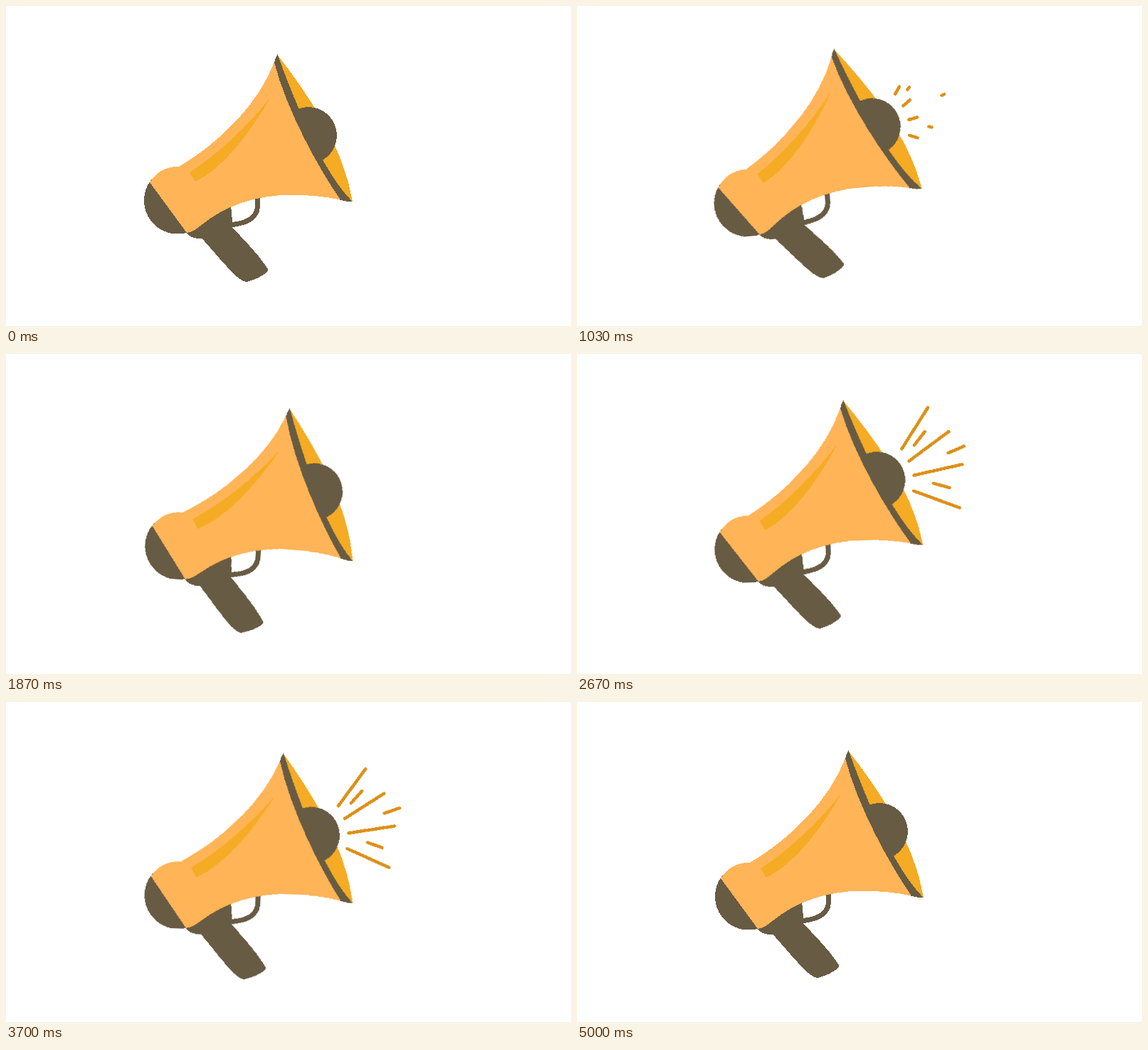
An HTML page without scripts for the animation above (5.03 s loop, 794x450 px).

```html
<!DOCTYPE html>
<html lang="en">
<head>
<meta charset="utf-8">
<title>Megaphone</title>
<style>
  html, body { margin: 0; width: 100%; height: 100%; overflow: hidden; background: #fff; }
  svg { display: block; width: 100%; height: 100%; shape-rendering: crispEdges; }

  .horn { transform-origin: 283px 290px; animation: swing 5030ms linear infinite; }
  .dark { fill: #685b43; }
  .light { fill: #ffb457; }
  .deep { fill: #f5ab23; }
  .guard { fill: none; stroke: #685b43; stroke-width: 7; }

  .rays {
    fill: none;
    stroke: #dd8f16;
    stroke-width: 4.5;
    stroke-linecap: round;
    stroke-dasharray: 100 200;
    animation: shout 5030ms linear infinite;
  }

  @keyframes swing {
    0%, 1.98% { transform: rotate(0deg); }
    1.99% { transform: rotate(-.2deg); }
    19.88% { transform: rotate(-5.5deg); }
    39.72% { transform: rotate(6deg); }
    59.94% { transform: rotate(-5.9deg); }
    79.92% { transform: rotate(5.95deg); }
    99.4%, 100% { transform: rotate(0deg); }
  }

  /* 150 hides the rays, 100 to 0 draws them outwards */
  @keyframes shout {
    0%, 1.98% { stroke-dashoffset: 150; }
    1.99% { stroke-dashoffset: 97; }
    16.9%, 18.18% { stroke-dashoffset: 0; }
    18.19% { stroke-dashoffset: 100; }
    36.18%, 36.57% { stroke-dashoffset: 0; }
    36.58%, 37.77% { stroke-dashoffset: 150; }
    37.78% { stroke-dashoffset: 100; }
    58.65%, 59.93% { stroke-dashoffset: 0; }
    59.94% { stroke-dashoffset: 100; }
    79.72%, 82.5% { stroke-dashoffset: 0; }
    82.51% { stroke-dashoffset: 100; }
    99%, 99.3% { stroke-dashoffset: 0; }
    99.31%, 100% { stroke-dashoffset: 150; }
  }
</style>
</head>
<body>
<svg viewBox="0 0 794 450">
  <g class="horn">
    <!-- handle and trigger -->
    <path class="guard" d="M353 267C354.500 277 355 286 350 293C343 303 331 306 315 308"/>
    <path class="dark" d="M252 317C258 325 265 328 275 326.500C293 346 309 367 325 381Q334 388.500 339 387.800Q357 383 367.500 373.500Q369 371.500 366.500 367.500C352 346 335 330 318 311Q318 298 316 281L270 300Z"/>
    <circle class="dark" cx="241" cy="273.500" r="47"/>

    <!-- bell -->
    <path class="deep" d="M381 68C422 121 474 195 487 275L470 270L430 215Z"/>
    <circle class="dark" cx="425" cy="182" r="40"/>
    <path class="dark" d="M381.500 67.500Q378 74 377 80L390 150L430 240L470 273Q478 275 487 275.500Q467 255 447 220C428 184 404 130 383 72Z"/>
    <path class="light" d="M377 79C355 137 302 191 243 226Q217 225 202 248L254 319Q263 318 274 308.500C306 282 348 266 402 265.500Q440 266 470 272.500C439.500 229 393.500 145 377 79Z"/>
    <path class="deep" d="M258 234C298 208 339 170 372 128C345 175 306 228 266 247Z"/>

    <g class="rays">
      <path pathLength="100" d="M461.300 139.300L514 61.800"/>
      <path pathLength="100" d="M471.400 156.400L548.900 102.700"/>
      <path pathLength="100" d="M477.500 176.800L570.200 159"/>
      <path pathLength="100" d="M476.200 198.800L563 234"/>
      <path pathLength="100" d="M479.200 134.500L500.300 109.200"/>
      <path pathLength="100" d="M526.300 147.200L556.900 135.100"/>
      <path pathLength="100" d="M504.500 189L534.700 198.500"/>
    </g>
  </g>
</svg>
</body>
</html>
```
